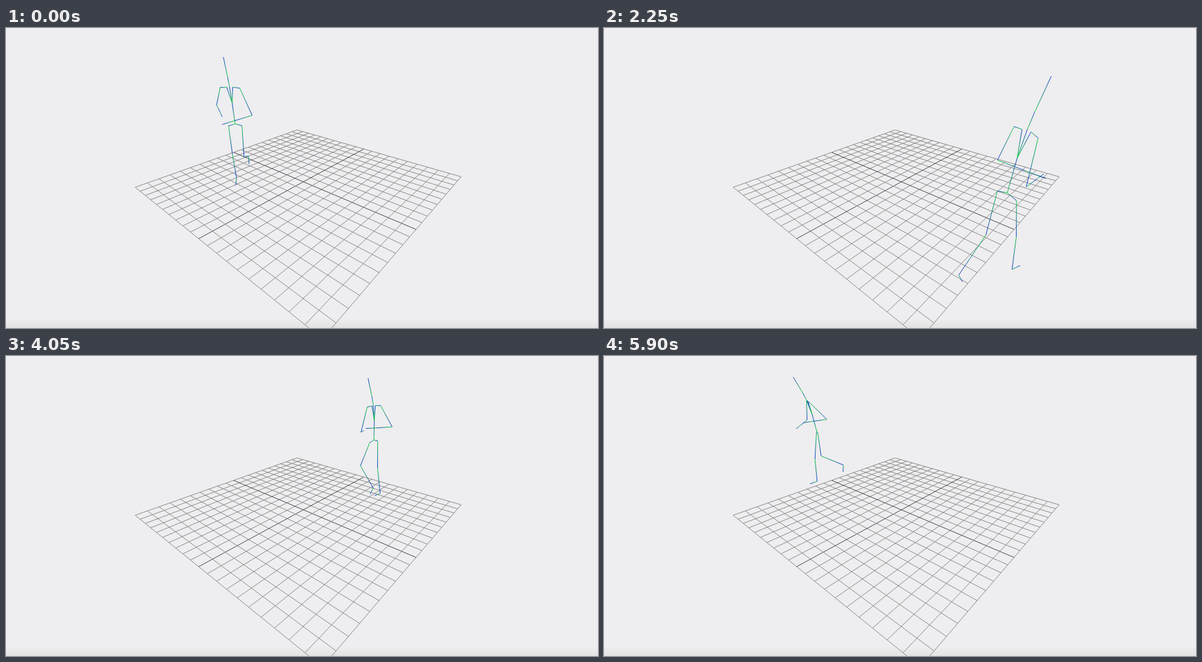
Recreate the animation shown at these times as an HTML page with a canvas. Size 960 by 487 pixels, loop 5.95 s.

```html
<!DOCTYPE html>
<html lang="en">
<head>
<meta charset="utf-8">
<title>Skeleton run</title>
<style>
html, body { margin: 0; width: 100%; height: 100%; overflow: hidden; background: #eeedef; }
canvas { display: block; }
</style>
</head>
<body>
<canvas id="stage" width="960" height="487"></canvas>
<script>
const ctx = document.getElementById('stage').getContext('2d');
const LOOP = 5950, STEP = 50, END = 5900, STRIDE = 800;
const { sin, cos, PI } = Math, rad = deg => deg * PI / 180;

// Route over the floor: time, u, v
const route = [
  [0, -.32, .41], [1000, .145, .88], [1500, .62, .96], [2250, 1.08, .52],
  [3350, .92, -.31], [4700, -.33, -.6], [END, -.96, .125]
];

// Camera: floor coordinates run from -1 to 1, height is in the same unit
function project([u, v, up]) {
  const w = 1 - .2357 * u - .2677 * v - .1878 * up;
  return [(481.7 + 26.13 * u - 253.27 * v - 90.1 * up) / w, (249.2 + .33 * u + .84 * v - 210.3 * up) / w];
}

// Smooth curve through the route
function place(t) {
  const i = Math.max(0, route.findLastIndex((k, j) => j < route.length - 1 && k[0] <= t));
  const a = route[i], b = route[i + 1], before = route[i - 1] || a, after = route[i + 2] || b;
  const d = b[0] - a[0], s = (t - a[0]) / d, r = 1 - s;
  return [1, 2].map(j => {
    const m = (b[j] - before[j]) / (b[0] - before[0]) * d;
    const n = (after[j] - a[j]) / (after[0] - a[0]) * d;
    return a[j] * (1 + 2 * s) * r * r + b[j] * s * s * (3 - 2 * s) + m * s * r * r - n * s * s * r;
  });
}

// Joints below are [forward, to the right, up] from the pelvis
const add = (p, length, angle) => [p[0] + length * sin(angle), p[1], p[2] - length * cos(angle)];

function leg(side, phase) {
  const hip = [0, side * .05, -.015];
  const thigh = rad(5 + 18 * cos(2 * PI * (phase - .8)));
  const bend = rad(8 + 75 * Math.max(0, cos(2 * PI * (phase - .6))) ** 1.5);
  const knee = add(hip, .24, thigh);
  const ankle = add(knee, .235, thigh - bend);
  return [[0, 0, 0], hip, knee, ankle, add(ankle, .075, thigh - bend + rad(70))];
}

function arm(side, phase, chest) {
  const back = cos(2 * PI * phase);
  const collar = [.045, side * .02, .275];
  const shoulder = [.04 - .025 * back, side * .07, .27];
  const elbow = add(shoulder, .19, rad(-18 - 28 * back));
  elbow[1] += side * .07;
  // The forearm turns across the chest as the arm comes forward
  const turn = rad(42 - 30 * back);
  const reach = d => [elbow[0] + d * cos(turn), elbow[1] - side * d * sin(turn), elbow[2] - d * .15];
  return [chest, collar, shoulder, elbow, reach(.13), reach(.22)];
}

function runner(t) {
  const [u, v] = place(t);
  const [u0, v0] = place(Math.max(0, t - 10)), [u1, v1] = place(Math.min(END, t + 10));
  const length = Math.hypot(u1 - u0, v1 - v0), a = (u1 - u0) / length, b = (v1 - v0) / length;
  const phase = (t - 1500) / STRIDE;
  const chest = [.02, 0, .16];
  const chains = [
    [[0, 0, 0], chest, [.05, 0, .28], [.075, 0, .345], [.135, 0, .475]],
    arm(1, phase, chest), arm(-1, phase + .5, chest),
    leg(1, phase), leg(-1, phase + .5)
  ];
  return chains.map(chain => chain.map(([f, s, up]) =>
    project([u + a * f - b * s, v + b * f + a * s, .55 + up])));
}

function line([x0, y0], [x1, y1], style) {
  ctx.strokeStyle = style;
  ctx.beginPath();
  ctx.moveTo(x0 + .5, y0 + .5);
  ctx.lineTo(x1 + .5, y1 + .5);
  ctx.stroke();
}

function bone(parent, child) {
  const g = ctx.createLinearGradient(...parent, ...child);
  g.addColorStop(0, '#08cc38');
  g.addColorStop(1, '#0a30d0');
  line(parent, child, g);
}

function drawFloor() {
  const shade = ctx.createLinearGradient(0, 472, 0, 487);
  shade.addColorStop(0, '#eeedef');
  shade.addColorStop(1, '#e4e3e4');
  ctx.fillStyle = shade;
  ctx.fillRect(0, 0, 960, 487);
  for (let i = -10; i <= 10; i++) {
    const k = i / 10, color = i ? '#888' : '#444';
    line(project([k, -1, 0]), project([k, 1, 0]), color);
    line(project([-1, k, 0]), project([1, k, 0]), color);
  }
}

function draw(now) {
  drawFloor();
  const t = Math.floor(now % LOOP / STEP) * STEP;
  for (const chain of runner(t))
    for (let i = 1; i < chain.length; i++) bone(chain[i - 1], chain[i]);
}

const began = performance.now();
function tick() {
  draw(performance.now() - began);
  requestAnimationFrame(tick);
}
tick();
</script>
</body>
</html>
```
